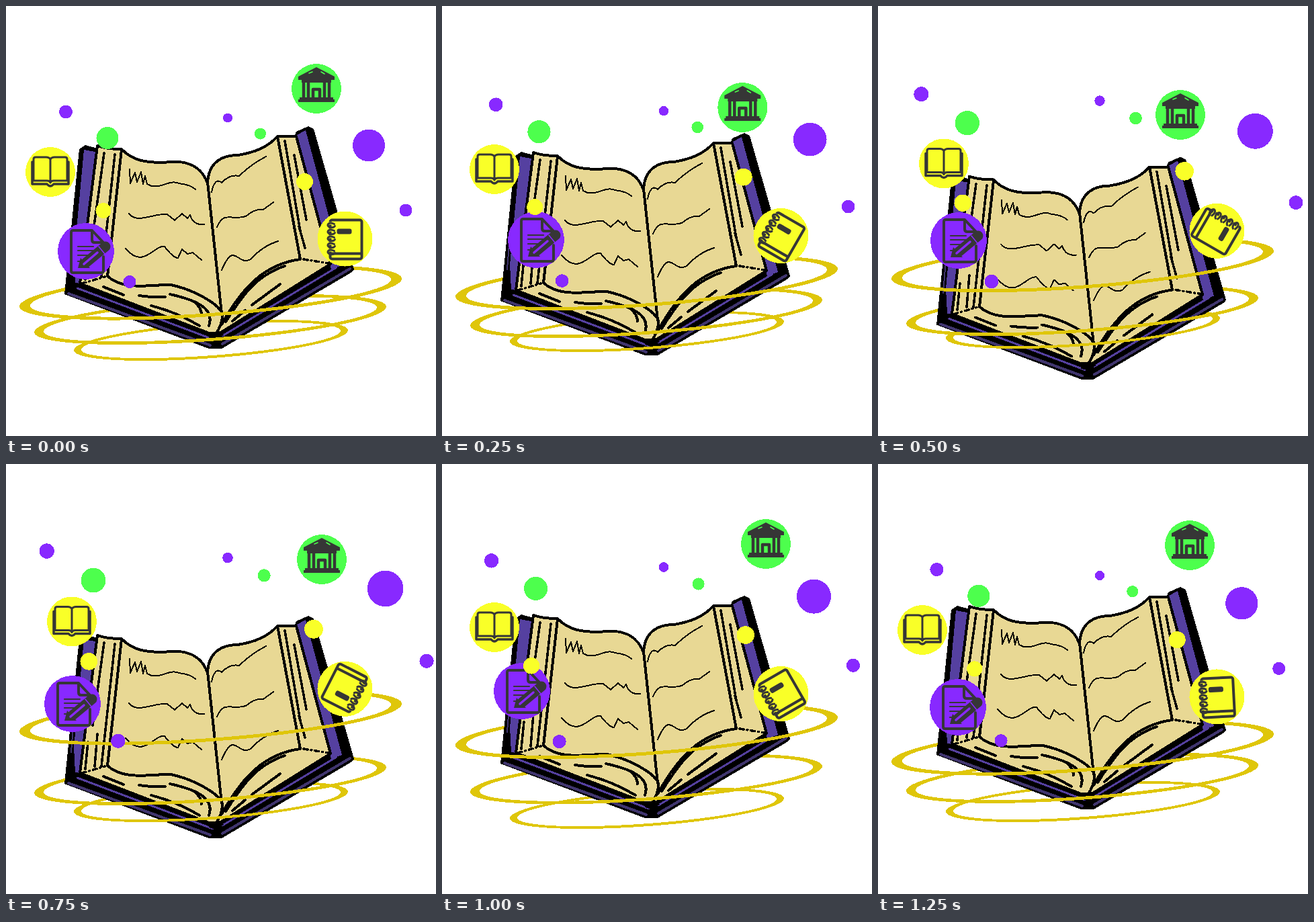
An HTML page that plays this animation: 640x640 px, repeating every 1.37 s.

```html
<!DOCTYPE html>
<html lang="en">
<head>
<meta charset="utf-8">
<title>Open book</title>
<style>
  html, body { margin: 0; width: 100%; height: 100%; overflow: hidden; background: #fff; }
  svg { display: block; width: 100%; height: 100%; }
</style>
</head>
<body>
<svg id="stage" viewBox="0 0 640 640" stroke-linecap="round" stroke-linejoin="round"></svg>
<script>
const stage = document.getElementById('stage');
const PURPLE = '#8829ff', GREEN = '#4dff4d', YELLOW = '#f9ff28';
const INK = '#363636', GOLD = '#dfc60a', PAGE = '#e8d894', COVER = '#5540a0', COVER_DARK = '#40356e';

function add(parent, tag, attrs = {}) {
  const el = document.createElementNS('http://www.w3.org/2000/svg', tag);
  for (const name in attrs) el.setAttribute(name, attrs[name]);
  parent.appendChild(el);
  return el;
}
const group = parent => add(parent, 'g');
const crispGroup = parent => add(parent, 'g', { 'shape-rendering': 'crispEdges' });
const fill = (parent, d, color) => add(parent, 'path', { d, fill: color });
const line = (parent, d, width, color = '#000') =>
  add(parent, 'path', { d, fill: 'none', stroke: color, 'stroke-width': width });

function drawBook(g) {
  fill(g, 'M109 213 118 207 136 212 172 260H404L432 187 450 179 458 183 491 298 518 392 515 396 321 510H302L87 429Z', '#000');
  fill(g, 'M116 214 133 217 110 413 103 412 101 375Z', COVER);
  fill(g, 'M433 192 446 185 500 386 484 392Z', COVER);
  line(g, 'M101 332 97 382', 2, COVER_DARK);
  line(g, 'M106 420 308 496M322 491 492 389', 3, COVER);
  line(g, 'M93 428 304 505M322 503 512 391', 4, COVER_DARK);

  const pages = fill(g, `M136 208Q149 213 172 213C188 230 207 233 235 233
    C268 228 291 238 300 264C301 232 322 222 345 222Q385 216 404 194
    L432 194 483 384 318 487 305 488 110 413Z`, PAGE);
  pages.setAttribute('stroke', '#000');
  pages.setAttribute('stroke-width', 4);

  line(g, 'M172 214 151 402M404 194 438 377M300 262 321 458', 4);
  line(g, 'M146 219 129 342M162 221 142 403M122 367 118 407M136 355 132 403', 3.5);
  line(g, 'M415 201 438 335M429 222 447 318M436 328 445 360', 3.5);
  line(g, 'M113 413 147 403M443 377 480 383', 3.5).setAttribute('stroke-dasharray', '6 5 1 5');

  // Curled lower page edges.
  line(g, 'M151 402C175 425 220 414 245 415 280 422 322 446 322 460Q322 475 312 488', 4);
  line(g, 'M438 377C385 384 352 418 321 474M415 387C370 402 350 434 327 470', 4);
  line(g, 'M244 429C275 436 312 447 302 476M280 440Q291 449 291 459M216 446Q255 456 288 476', 4);
  line(g, 'M145 418 175 430M198 431Q217 434 237 433M366 445 408 414M337 469 356 453', 4);
  fill(g, 'M302 485 322 484 324 490 312 497 302 494Z', '#000');

  // Handwriting, left page then right page.
  line(g, 'M184 243 185 264 192 248 195 262 201 247 204 265 207 253 210 265C228 276 242 257 257 264Q275 266 282 273', 2);
  line(g, 'M183 309C195 325 220 308 240 310L251 319 262 309 270 316 274 311Q279 327 295 325', 2);
  line(g, 'M178 361C205 393 220 355 236 358Q249 375 256 375L262 362 270 369 278 367 291 378', 2);
  line(g, 'M306 277Q311 254 321 263Q333 250 347 253Q364 236 387 224', 2);
  line(g, 'M314 329C325 304 334 320 357 313Q371 301 383 303L398 292', 2);
  line(g, 'M321 393C340 348 344 388 364 377Q382 357 405 350', 2);
}

// Half of a flat gold hoop: thick at the tips, thin in the middle.
function drawHalfRing(parent, { rx, ry, tip, thin }, front) {
  const g = crispGroup(parent), x = rx - tip, sweep = front ? 0 : 1;
  fill(g, `M${-rx} 0A${rx} ${ry + thin} 0 0 ${sweep} ${rx} 0H${x}A${x} ${ry - thin} 0 0 ${1 - sweep} ${-x} 0Z`, GOLD);
  return g;
}

function drawDisc(parent, r, color) {
  const g = group(parent);
  add(g, 'circle', { r, fill: color, 'shape-rendering': 'crispEdges' });
  return g;
}

function drawMuseum(parent) {
  const g = drawDisc(parent, 37, GREEN);
  fill(g, 'M0-32 27-18V-13H22V-9H-22V-13H-27V-18ZM-25 13H25V16H27V20H-27V16H-25Z', INK);
  for (const x of [-19, -12, 12, 19]) line(g, `M${x}-10V14`, 4.5, INK);
  line(g, 'M-11-23-6-25M7-25 12-22', 1.6, GREEN);
  line(g, 'M-5 13V1H5V13', 4.5, INK);
  return g;
}

function drawDocument(parent) {
  const g = drawDisc(parent, 42, PURPLE);
  line(g, 'M26 8V29Q26 32 23 32H-19Q-22 32-22 29V-28Q-22-31-19-31H9L26-13M9-31V-17Q9-13 13-13H26', 4, INK);
  line(g, 'M-12-7H11M-12-1H13M-12 6H5M-12 15H-5', 2.2, INK);
  fill(g, 'M-12 25-8 10 6 25Z', INK);
  line(g, 'M0 17 29-7', 15, INK);
  line(g, 'M-3 19 17 2', 3.5, PURPLE);
  line(g, 'M19-7 28 4', 1.5, PURPLE);
  return g;
}

function drawOpenBook(parent) {
  const g = drawDisc(parent, 37, YELLOW);
  line(g, 'M0-19Q-2-22-6-22H-22Q-25-22-25-19V13H-5Q-1 13 0 16Q1 13 5 13H25V-19Q25-22 22-22H6Q2-22 0-19V14', 3, INK);
  line(g, 'M-27-15V18H-5Q0 24 5 18H27V-15', 3.5, INK);
  return g;
}

function drawNotebook(parent) {
  const g = drawDisc(parent, 41, YELLOW);
  add(g, 'rect', { x: -22, y: -28, width: 47, height: 58, rx: 3, fill: 'none', stroke: INK, 'stroke-width': 4 });
  line(g, 'M-22 22H24', 4, INK);
  add(g, 'rect', { x: -12, y: -15, width: 22, height: 8, rx: 3, fill: INK });
  for (let y = -21; y < 20; y += 10) {
    line(g, `M-16 ${y - 2}H-27`, 4, YELLOW);
    line(g, `M-15 ${y + 2}Q-17 ${y + 5} -22 ${y + 4}Q-27 ${y + 2} -25 ${y - 1}Q-22 ${y - 4} -16 ${y - 1}`, 3, INK);
  }
  return g;
}

// Motion runs on a stepped clock of eight poses a second, eleven to a loop.
const LOOP = 1370;
const stepAt = time => Math.floor(Math.floor(time % LOOP / 10) / 12.5);

const wave = (step, period) => Math.sin(2 * Math.PI * step / period);
const pulse = (step, period) => Math.sin(Math.PI * step / period) ** 2;
const fold = step => 5 - Math.abs(step - 5);

// Straight travel between [step, ...values] stops.
function travel(step, ...stops) {
  const next = Math.max(1, stops.findIndex(stop => stop[0] >= step));
  const a = stops[next - 1], b = stops[next];
  const t = (step - a[0]) / (b[0] - a[0]);
  return a.slice(1).map((v, i) => v + (b[i + 1] - v) * t);
}

const rings = [
  { x: 304.5, y: 426.5, rx: 284.5, ry: 33, tip: 16, thin: 2.5,
    shift: s => -50 * pulse(s, 11) },
  { x: 304, y: 466.5, rx: 262, ry: 30, tip: 14, thin: 2.4,
    shift: s => travel(s, [0, 0], [2, -10], [4, -13], [6, 4], [11, 0])[0] },
  { x: 305, y: 497.5, rx: 204, ry: 24.7, tip: 11, thin: 2,
    shift: s => travel(s, [0, 0], [2, -13], [4, -18], [6, 5], [8, 15], [11, 0])[0] }
];
rings.forEach(ring => ring.back = drawHalfRing(stage, ring, false));
const book = crispGroup(stage);
drawBook(book);
rings.forEach(ring => ring.front = drawHalfRing(stage, ring, true));

const openBook = drawOpenBook(stage), doc = drawDocument(stage);
const museum = drawMuseum(stage), notebook = drawNotebook(stage);

const dots = crispGroup(stage);
const dot = (color, cx, cy, r) => add(dots, 'circle', { cx, cy, r, fill: color });
dot(PURPLE, 89, 157, 10);
dot(PURPLE, 330, 166, 7);
dot(PURPLE, 540, 207, 24);
dot(PURPLE, 595, 303.5, 9.5);
dot(PURPLE, 184, 410, 9.5);
dot(GREEN, 151, 196, 16.5);
dot(GREEN, 378.5, 189.5, 8.5);
dot(YELLOW, 444.5, 261, 12.5);
dot(YELLOW, 145, 304, 11.5);

const place = (el, transform) => el.setAttribute('transform', transform);

function render(time) {
  const s = stepAt(time);

  const lift = travel(s, [0, 0], [2, 10], [3, 40], [5, 51], [6, 47], [8, 17], [10, 4]);
  place(book, `translate(0 ${lift})`);

  for (const ring of rings) {
    const transform = `matrix(1 -.0725 0 1 ${ring.x} ${ring.y + ring.shift(s)})`;
    place(ring.back, transform);
    place(ring.front, transform);
  }

  const museumAt = travel(s, [0, 462, 123], [3, 440, 165], [4, 450, 162], [6, 470, 142], [8, 482, 119], [10, 464, 121]);
  const docAt = travel(s, [0, 119, 365], [2, 140, 348], [3, 129.5, 332], [4, 120, 349], [6, 99, 357], [8, 119, 338], [10, 119, 362]);
  const openAt = travel(fold(s), [0, 66, 247], [2, 78, 243], [3, 88, 247], [5, 108, 222]);
  place(museum, `translate(${museumAt})`);
  place(doc, `translate(${docAt})`);
  place(openBook, `translate(${openAt})`);

  const turn = travel(s, [0, 0], [2, 30], [3, 90], [4, 120], [6, 207], [8, 330], [10, 357]);
  place(notebook, `translate(504.5 ${340 - 6.5 * wave(s - 2.5, 10)}) rotate(${turn})`);

  const spread = 1 + 0.121 * pulse(s, 10.8);
  place(dots, `translate(330 ${400.5 - 2 * wave(s, 11)}) scale(${spread}) translate(-330 -400)`);
}

const begin = performance.now();
function tick() {
  render(performance.now() - begin);
  requestAnimationFrame(tick);
}
render(0);
requestAnimationFrame(tick);
</script>
</body>
</html>
```
